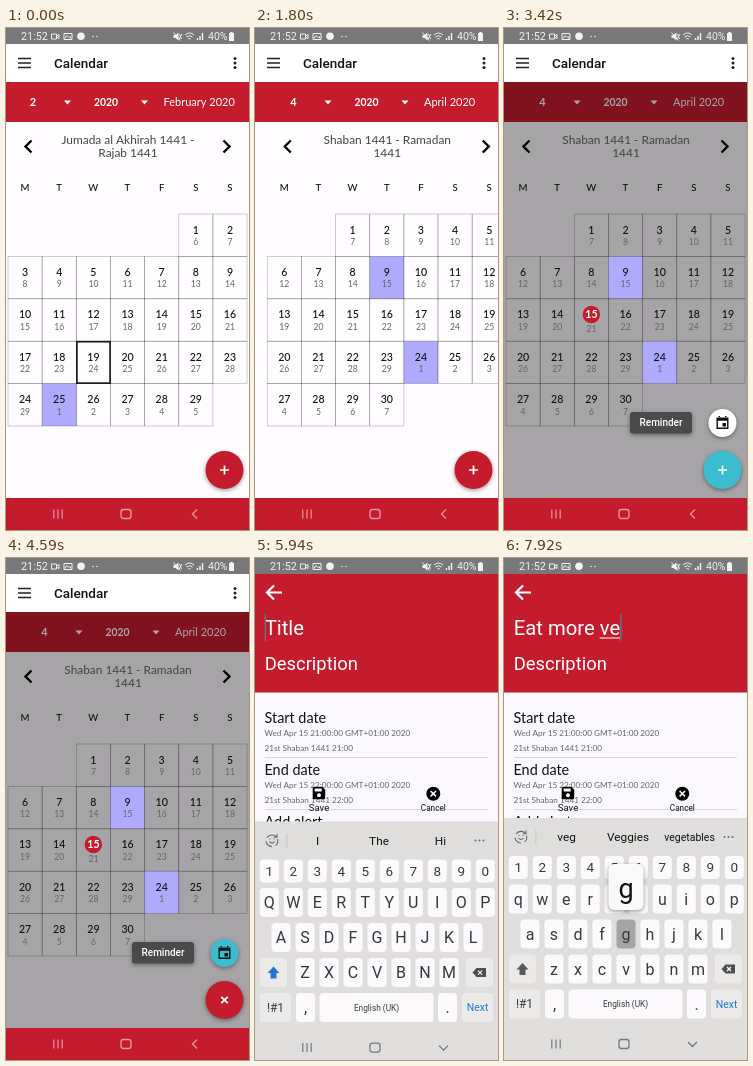
An HTML page with a canvas for the animation above (8000 ms loop, 243 px wide and 502 px high).

```html
<!DOCTYPE html>
<html lang="en">
<head>
<meta charset="utf-8">
<title>Calendar reminder</title>
<style>
  html, body { margin: 0; width: 100%; height: 100%; overflow: hidden; }
  canvas { display: block; width: 100%; height: 100%; }
</style>
</head>
<body>
<canvas></canvas>
<script>
const W = 243, H = 502, LOOP = 8000;
const RED = '#c41c2d', TEAL = '#3bbccf', PURPLE = '#b0aafc', BOARD = '#dfdedc';
const GEO = 'Lato, sans-serif', ROBOTO = 'Roboto, sans-serif';
const canvas = document.querySelector('canvas');
const c = canvas.getContext('2d');

const clamp = v => Math.max(0, Math.min(1, v));
const progress = (t, start, length) => clamp((t - start) / length);
const easeOut = u => 1 - (1 - u) ** 3;

function rect(x, y, w, h, color, r = 0) {
  c.fillStyle = color;
  c.beginPath();
  c.roundRect(x, y, w, h, r);
  c.fill();
}
function disc(x, y, r, color) {
  c.fillStyle = color;
  c.beginPath();
  c.arc(x, y, r, 0, 7);
  c.fill();
}
function path(d, x, y, color, width = 0) {
  c.save();
  c.translate(x, y);
  const p = new Path2D(d);
  if (width) {
    c.strokeStyle = color;
    c.lineWidth = width;
    c.stroke(p);
  } else {
    c.fillStyle = color;
    c.fill(p, 'evenodd');
  }
  c.restore();
}
function text(s, x, y, size, { color = '#111', weight = 400, align = 'center', font = ROBOTO } = {}) {
  c.font = `${weight} ${size}px ${font}`;
  c.textAlign = align;
  c.fillStyle = color;
  c.fillText(s, x, y);
}
function raised(draw) {
  c.save();
  c.shadowColor = 'rgba(0,0,0,.4)';
  c.shadowBlur = 4 * scale;
  c.shadowOffsetY = 1.5 * scale;
  draw();
  c.restore();
}

function statusBar() {
  rect(0, 0, W, 16, '#78777a');
  const color = '#f2f2f2', left = { color, align: 'left' };
  text('21:52', 15, 12, 10.8, left);
  path('M0 0h5v5h-5zM5 2l2.5-1.5v4L5 3', 45.5, 6, color, 1);
  path('M0 0h8v6h-8zM1 5l2-3 2 2 1-1 1 2', 58, 5.5, color, 1);
  disc(75, 8.3, 3.8, color);
  disc(87, 8.5, .8, color);
  disc(91, 8.5, .8, color);
  path('M0 2.5h2l3-2.5v8l-3-2.5h-2z', 167.5, 4.5, color);
  path('M6 1.500l2 5M8.500 1.500l-3 5M0 0l7 8', 167.5, 4.5, color, 1);
  path('M0 2q4.5-4 9 0M1.5 4q3-2.6 6 0M3.2 6q1.3-1 2.6 0', 179, 5, color, 1);
  path('M0 7v-2M2.5 7v-4M5 7v-7', 191.5, 5, color, 1.4);
  text('40%', 202, 12, 10.5, left);
  path('M0 1h1.3v-1h2.4v1h1.3v8h-5z', 223, 4, color);
}

function navBar(keyboardUp) {
  rect(0, 470, W, 32, keyboardUp ? BOARD : RED);
  const color = keyboardUp ? '#77777a' : '#e29aa2';
  path('M0 0v9M4.2 0v9M8.4 0v9', 47.8, 481.5, color, 1.2);
  c.strokeStyle = color;
  c.lineWidth = 1.3;
  c.beginPath();
  c.roundRect(115, 481.5, 10, 9, 2.5);
  c.stroke();
  path(keyboardUp ? 'M0 0l4.5 4.5 4.5-4.5' : 'M5 0l-4.5 4.5 4.5 4.5', keyboardUp ? 184 : 186, keyboardUp ? 484 : 481.5, color, 1.3);
}

// col: weekday column of day 1; lunar: lunar day on day 1; lunarDays: length of that lunar month
const MONTHS = [
  { number: 2, label: 'February 2020', shift: 0, days: 29, col: 5, lunar: 6, lunarDays: 29, marked: [25], today: 19,
    title: ['Jumada al Akhirah 1441 -', 'Rajab 1441'] },
  { number: 3, label: 'March 2020', shift: 6, days: 31, col: 6, lunar: 6, lunarDays: 30, marked: [22],
    title: ['Rajab 1441 - Shaban', '1441'] },
  { number: 4, label: 'April 2020', shift: 11.5, days: 30, col: 2, lunar: 7, lunarDays: 29, marked: [9, 24],
    title: ['Shaban 1441 - Ramadan', '1441'] }
];
const TURNS = [500, 1410], LEAVE = 180, ENTER = 600;
const SELECT = 2300, OPEN = 3320, CHOOSE = 4440, FORM = 4640;

function monthHeader(m) {
  rect(0, 54, W, 40, RED);
  const bold = { color: '#fff', weight: 700, font: GEO };
  text(m.number, 27 + m.shift, 78, 11, bold);
  text('2020', 100 + m.shift, 78, 10.4, bold);
  for (const x of [58, 135]) path('M0 0h7l-3.5 4z', x + m.shift, 72.5, '#fff');
  text(m.label, 157.5 + m.shift, 78, 11, { color: '#fff', align: 'left', font: GEO });
}

function monthPage(m, offset, selected) {
  const cell = 34.15, row = 42.4;
  c.save();
  c.translate(offset, 0);
  path('M6.5 0l-6 6 6 6', 19, 112.5, '#000', 2.4);
  path('M0 0l6 6-6 6', 217.5, 112.5, '#000', 2.4);
  m.title.forEach((line, i) => text(line, 122, 116 + 13.3 * i, 11.9, { color: '#444', font: GEO }));
  [...'MTWTFSS'].forEach((d, i) => text(d, 19 + cell * i, 163, 9.6, { weight: 500, font: GEO }));
  for (let d = 1; d <= m.days; d++) {
    const i = d - 1 + m.col;
    const x = 2 + i % 7 * cell, y = 186 + Math.floor(i / 7) * row, mid = x + cell / 2;
    if (m.marked.includes(d)) rect(x, y, cell, row, PURPLE);
    c.strokeStyle = 'rgba(0,0,0,.27)';
    c.lineWidth = .7;
    c.strokeRect(x, y, cell, row);
    const picked = d === selected;
    if (picked) disc(mid, y + 15.7, 8.7, RED);
    text(d, mid, y + 19.6, 10.6, { color: picked ? '#fff' : '#111', weight: picked ? 700 : 500, font: GEO });
    text((m.lunar + d - 2) % m.lunarDays + 1, mid, y + (picked ? 33 : 31), 8.6, { color: '#666', font: GEO });
  }
  if (m.today) {
    const i = m.today - 1 + m.col;
    c.strokeStyle = '#111';
    c.lineWidth = 1.6;
    c.strokeRect(2.6 + i % 7 * cell, 186.5 + Math.floor(i / 7) * row, cell - 1, row - 1);
  }
  c.restore();
}

function floatingButtons(t) {
  const open = easeOut(progress(t, OPEN, 90));
  if (open) {
    c.save();
    c.globalAlpha = open;
    raised(() => rect(126, 384, 62, 21.5, '#4a494c', 3));
    text('Reminder', 157, 398.3, 10, { color: '#fff', weight: 500 });
    raised(() => disc(218.5, 395, 14, t > CHOOSE ? TEAL : '#fff'));
    path('M0 1.5h12v11.5h-12zM1.4 4.8v6.8h9.2v-6.8zM2 0h1.5v2h-1.5zM8.5 0h1.5v2h-1.5zM6 7h3.5v3.5h-3.5z', 212.5, 388, '#111');
    c.restore();
  }
  raised(() => disc(218.5, 442, 19, t > 3200 && t < 3650 ? TEAL : RED));
  c.save();
  c.translate(218.5, 442);
  c.rotate(Math.PI / 4 * easeOut(progress(t, 3440, 200)));
  path('M-4.5 0h9M0-4.5v9', 0, 0, '#fff', 1.7);
  c.restore();
}

function calendarScreen(t) {
  rect(0, 16, W, 454, '#fefcfe');
  const index = TURNS.filter(start => t >= start).length;
  const m = MONTHS[index];
  monthHeader(m);
  // Highlights stay bright above the dimmed backdrop.
  rect(0, 54, W, 416, `rgba(0,0,0,${.35 * easeOut(progress(t, OPEN, 90))})`);
  const entering = index ? W * (1 - easeOut(progress(t, TURNS[index - 1], ENTER))) : 0;
  const leaving = index < TURNS.length ? W * progress(t, TURNS[index] - LEAVE, LEAVE) ** 2 : 0;
  monthPage(m, entering - leaving, index === 2 && t >= SELECT ? 15 : 0);
  rect(0, 16, W, 38, '#fff');
  path('M0 0h13M0 4.5h13M0 9h13', 12, 30.5, '#222', 1.4);
  text('Calendar', 48, 40.3, 13.5, { weight: 500, align: 'left' });
  for (const y of [30.5, 35, 39.5]) disc(229, y, 1.5, '#222');
  floatingButtons(t);
}

// Each key press: [time, character]
const PRESSES = [6120, 6250, 6380, 6500, 6800, 6950, 7080, 7220, 7400, 7560, 7720, 7880]
  .map((time, i) => [time, 'Eat more veg'[i]]);
const KEYBOARD = 5760;
const SUGGESTIONS = {
  '': ['I', 'The', 'Hi'],
  'E': ['E', 'Even', 'Every'],
  'Ea': ['Ea', 'Each', 'Easy'],
  'Eat': ['Eat', 'Eating', 'Eats'],
  'Eat ': ['healthy', 'a', 'your'],
  'Eat m': ['m', 'my', 'me'],
  'Eat mo': ['mo', 'more', 'most'],
  'Eat mor': ['mor', 'more', 'morning'],
  'Eat more': ['more', 'moreover', 'mores'],
  'Eat more ': ['than', 'of', 'and'],
  'Eat more v': ['v', 'very', 'via'],
  'Eat more ve': ['veg', 'Veggies', 'vegetables'],
  'Eat more veg': ['veg', 'Veggies', 'vegetables']
};
const typedAt = t => PRESSES.filter(p => t >= p[0] + 70).map(p => p[1]).join('');

function key(label, x, y, w, h, { size = 14, special, pressed, color = '#38383a' } = {}) {
  rect(x - w / 2, y - h / 2, w, h, pressed ? '#a5a4a5' : special ? '#ebeae9' : '#fbf9fb', 4);
  text(label, x, y + size * .35, size, { color });
}

function keyboard(t, typed) {
  rect(0, 260, W, 242, BOARD);
  c.strokeStyle = '#6a6a6c';
  path('M2 3.500a6 6 0 0 1 9.500-.5M12.500 5a6 6 0 0 1-2 6.500M1 7a6 6 0 0 0 6 5.500M12 0v3.200h-3M4.500 7.500q2.500 3 5 0M5 4.500v1M9 4.500v1', 10, 272.5, '#6a6a6c', 1.1);
  rect(31.5, 272, .8, 15, '#bdbcba');
  SUGGESTIONS[typed].forEach((word, i) => text(word, 62.5 + 61.5 * i, 283, word.length > 9 ? 10.5 : 11.8));
  for (const x of [220.5, 224.5, 228.5]) disc(x, 279, 1, '#6a6a6c');

  const active = PRESSES.find(([time]) => t >= time && t < time + 110);
  const pressed = active ? active[1].toLowerCase() : '';
  const rows = [['1234567890', 14.3, 309.5, 23], ['qwertyuiop', 14.3, 341, 29], ['asdfghjkl', 26, 376, 29], ['zxcvbnm', 50, 411, 29]];
  let popup;
  for (const [letters, left, y, h] of rows) {
    [...letters].forEach((ch, i) => {
      const x = left + 24 * i;
      key(typed ? ch : ch.toUpperCase(), x, y, 19, h, { size: h < 25 ? 13.5 : 16, pressed: ch === pressed });
      if (ch === pressed) popup = { x, y, label: active[1] };
    });
  }
  key('', 18.5, 411, 27, 29, { special: true });
  path('M6 0l6 6.5h-3v5.5h-6v-5.5h-3z', 12.5, 405, typed ? '#5a5a5c' : '#2176d2');
  key('', 224.5, 411, 27, 29, { special: true });
  path('M4 0h9.500v9h-9.500l-4-4.5z', 217.5, 406.5, '#505052');
  path('M0 0l4 4M4 0l-4 4', 223, 409, '#fff', 1.2);
  key('!#1', 20.5, 446, 31, 29, { size: 12, special: true });
  key(',', 50.5, 446, 19, 29, { size: 16 });
  key('English (UK)', 121.5, 446, 114, 29, { size: 8.3, pressed: pressed === ' ' });
  key('.', 192.5, 446, 19, 29, { size: 16 });
  key('Next', 222.5, 446, 31, 29, { size: 10.5, special: true, color: '#2878d8' });
  if (popup) {
    raised(() => rect(popup.x - 17.5, popup.y - 70, 35, 46, '#faf9fa', 6));
    text(popup.label, popup.x, popup.y - 36, 27);
  }
}

function titleField(t, typed) {
  text(typed || 'Title', 9.7, 77, 20.3, { color: '#fff', align: 'left' });
  if (t < KEYBOARD) return;
  const end = 9.7 + (typed ? c.measureText(typed).width : 0);
  const word = typed.split(' ').pop();
  if (word) {
    const width = c.measureText(word).width;
    rect(end - width, 79.5, width, 1, '#fff');
  }
  rect(end, 56, 1.3, 27, '#4f7f88');
}

function formScreen(t) {
  const typed = typedAt(t);
  rect(0, 16, W, 454, '#faf8fc');
  rect(0, 16, W, 118.5, RED);
  path('M8 0l-7 7 7 7M1 7h15', 11, 27.5, '#fff', 2.2);
  titleField(t, typed);
  text('Description', 9.7, 112.3, 18.4, { color: '#fff', align: 'left' });

  const field = (y, name, lines) => {
    text(name, 9.5, y, 14.4, { align: 'left', font: GEO });
    lines.forEach((line, i) => text(line, 9.5, y + 13 + 14.7 * i, 8.2, { color: '#666', align: 'left', font: GEO }));
  };
  field(165, 'Start date', ['Wed Apr 15 21:00:00 GMT+01:00 2020', '21st Shaban 1441 21:00']);
  field(217, 'End date', ['Wed Apr 15 22:00:00 GMT+01:00 2020', '21st Shaban 1441 22:00']);
  field(269, 'Add alert', ['Choose']);
  for (const y of [199, 251]) rect(10, y, 223, .8, '#cfcdd2');

  const y = t >= KEYBOARD + 100 ? 235 : 444;
  path('M1.5 0h8l3 3v8q0 1.5-1.5 1.5h-9.5q-1.5 0-1.5-1.5v-9.5q0-1.5 1.5-1.5zM2 1.7v3h7v-3zM6.3 6.5a2 2 0 1 0 .01 0z', 57.7, y - 6.3, '#000');
  text('Save', 64, y + 18.3, 9.6);
  disc(178.3, y + .7, 7, '#000');
  path('M-2.7-2.7l5.4 5.4M2.7-2.7l-5.4 5.4', 178.3, y + .7, '#fff', 1.5);
  text('Cancel', 178.3, y + 18.3, 8.2);

  navBar(false);
  if (t >= KEYBOARD) {
    c.save();
    c.translate(0, 242 * (1 - easeOut(progress(t, KEYBOARD, 240))));
    keyboard(t, typed);
    navBar(true);
    c.restore();
  }
}

let scale = 1;
function draw(t) {
  scale = canvas.width / W;
  c.setTransform(scale, 0, 0, canvas.height / H, 0, 0);
  const shown = easeOut(progress(t, FORM, 220));
  if (shown < 1) {
    calendarScreen(t);
    navBar(false);
  }
  if (shown) {
    c.save();
    c.globalAlpha = shown;
    c.translate(0, 30 * (1 - shown));
    formScreen(t);
    c.restore();
  }
  statusBar();
}

function resize() {
  canvas.width = Math.round(innerWidth * devicePixelRatio);
  canvas.height = Math.round(innerHeight * devicePixelRatio);
}
addEventListener('resize', resize);
resize();
const start = performance.now();
function tick() {
  draw((performance.now() - start) % LOOP);
  requestAnimationFrame(tick);
}
tick();
</script>
</body>
</html>
```
